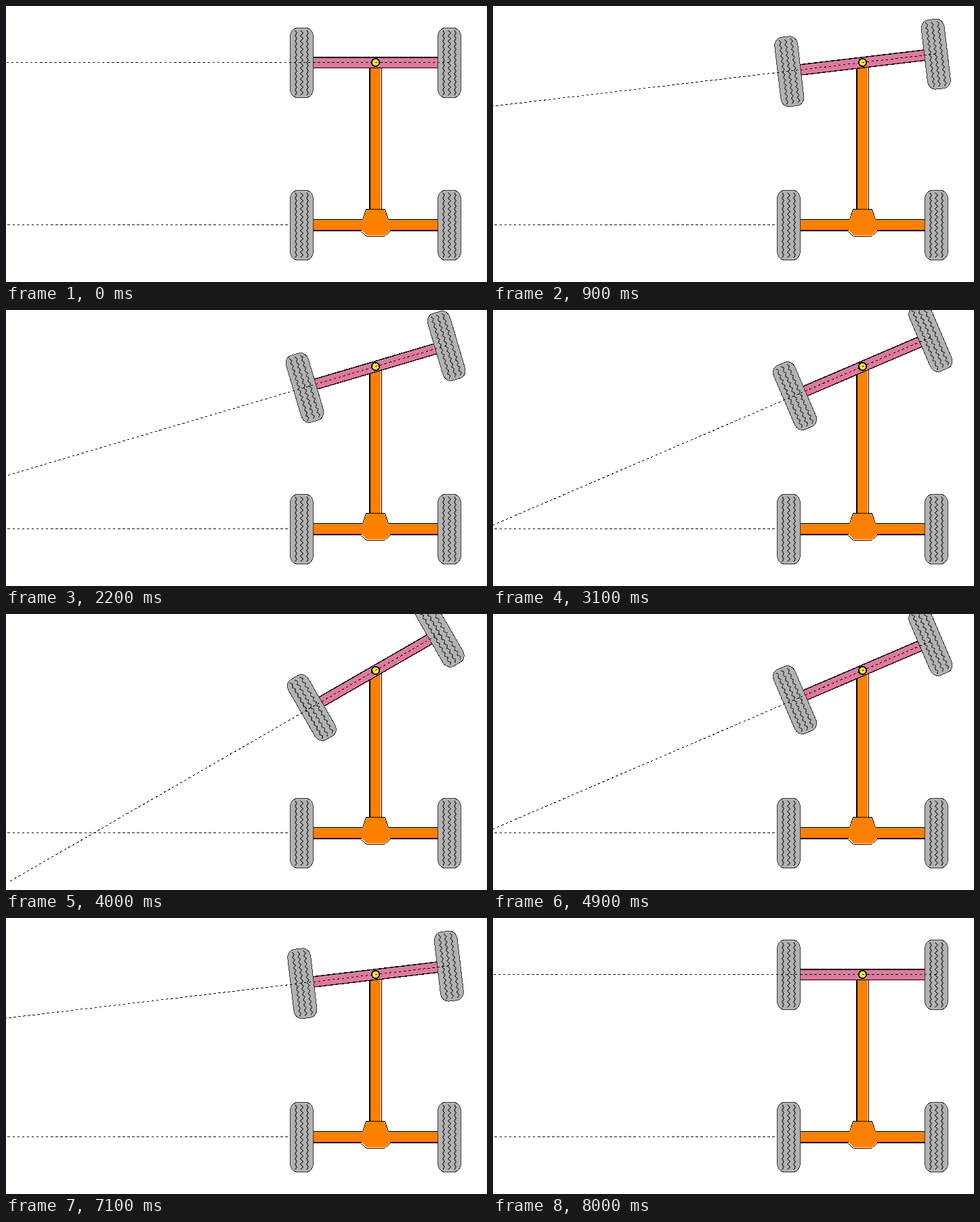
Recreate the animation shown at these times as an HTML page. Size 710 px wide and 408 px high, loop 8.1 s.

```html
<!DOCTYPE html>
<html lang="en">
<head>
<meta charset="utf-8">
<title>Turntable steering</title>
<style>
  html, body { margin: 0; width: 100%; height: 100%; overflow: hidden; background: #fff; }
  svg { display: block; width: 100%; height: 100%; shape-rendering: crispEdges; }
  .dash { stroke: #000; stroke-dasharray: 3.5 3.57; fill: none; }
  .orange { fill: #ff8000; }
  .white { fill: #fff; }
</style>
</head>
<body>
<svg viewBox="0 0 710 408">
  <defs>
    <g id="wheel">
      <rect x="-17" y="-51.5" width="34" height="103" rx="11" ry="13" fill="#b2b2b2" stroke="#383838"/>
      <path id="tread" fill="none" stroke="#484848" stroke-width="1.5"/>
    </g>
  </defs>
  <rect class="white" width="710" height="408"/>

  <!-- fixed rear axle and frame -->
  <path class="dash" d="M437.2 323.5H-10"/>
  <rect x="536" y="84" width="19" height="218"/>
  <rect class="white" x="538" y="84" width="16" height="218"/>
  <rect class="orange" x="538" y="84" width="15" height="218"/>
  <rect x="453" y="315" width="185" height="18"/>
  <rect class="orange" x="453" y="316" width="185" height="15"/>
  <path class="white" stroke="#000"
    d="M526.5 315.5L531.5 300.5H559.5L564.5 315.5V331.5H568.5L560.5 339.5L557 340.5H534L530.5 339.5L522.5 331.5H526.5Z"/>
  <path class="orange" d="M526 316L532.5 301H558.5L565 316V331H567L560 338L557 339H534L531 338L524 331H526Z"/>
  <use href="#wheel" x="436.5" y="324"/>
  <use href="#wheel" x="654.5" y="324"/>

  <!-- turning front axle, drawn around its pivot -->
  <g id="front">
    <rect x="-93" y="-8.4" width="186" height="16.8"/>
    <rect x="-93" y="-6.95" width="186" height="14" fill="#de7a9d"/>
    <use href="#wheel" x="-109" y="0.5"/>
    <use href="#wheel" x="109" y="0.5"/>
    <circle r="5.7" fill="#ffee20" stroke="#000" stroke-width="1.6"/>
    <path class="dash" d="M109 0H-623"/>
  </g>
</svg>
<script>
  const STEP = 100, STEPS = 81, PEAK = 40, DEGREES = 0.75;
  const front = document.getElementById('front');

  function zigzag(x) {
    let d = '';
    for (let i = 0; i <= 24; i++) {
      d += (i ? 'L' : 'M') + (x + (i % 2 ? 1.5 : -1.5)) + ' ' + (i - 12) * 4;
    }
    return d;
  }

  function draw(ms) {
    const step = Math.floor(ms / STEP) % STEPS;
    const angle = DEGREES * (PEAK - Math.abs(PEAK - step));
    front.setAttribute('transform', `translate(545.5 83.5) rotate(${-angle})`);
  }

  document.getElementById('tread').setAttribute('d', [-8.5, 0, 8.5].map(zigzag).join(''));

  const start = performance.now();
  function tick() {
    draw(performance.now() - start);
    requestAnimationFrame(tick);
  }
  tick();
</script>
</body>
</html>
```
